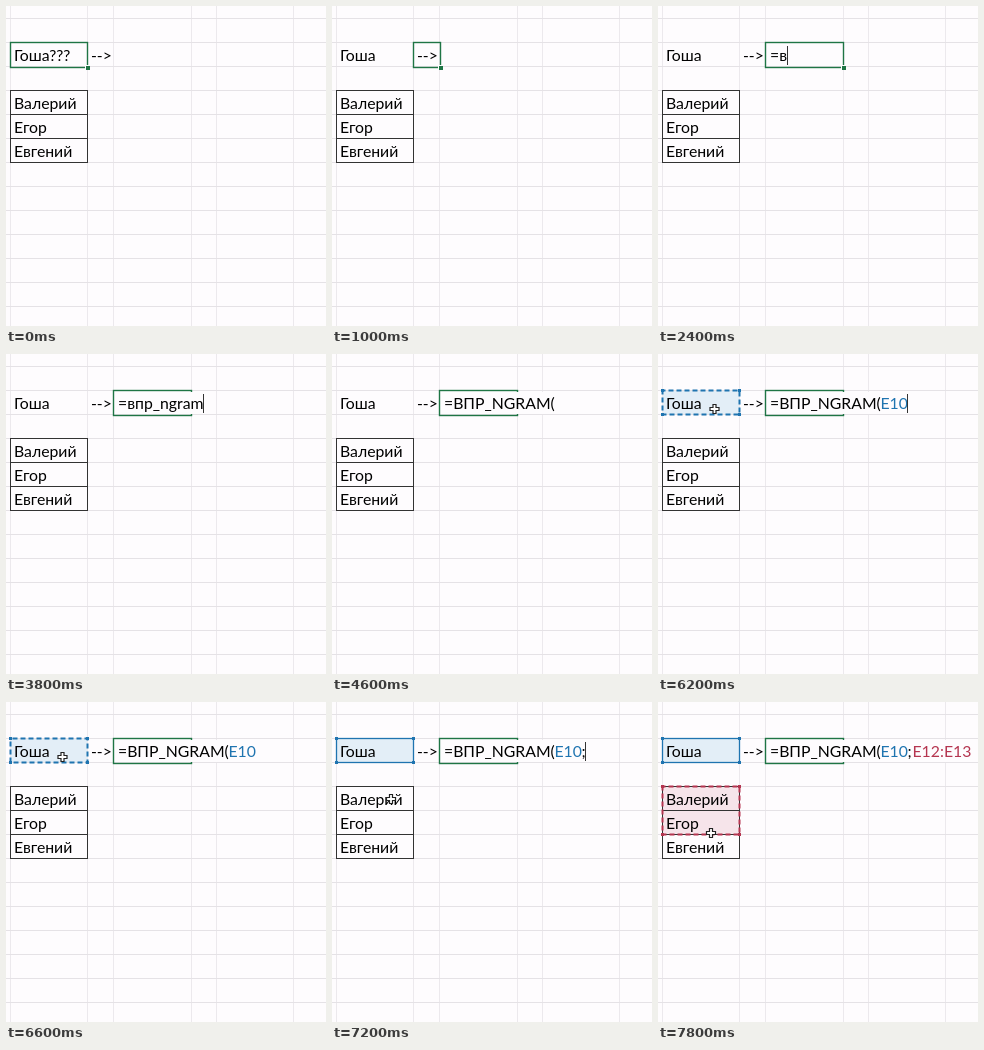
An HTML page with a canvas for the animation above (8 s loop, 320 px wide and 320 px high).

```html
<!DOCTYPE html>
<html lang="ru">
<head>
<meta charset="utf-8">
<style>
  html, body { margin: 0; width: 100%; height: 100%; overflow: hidden; background: #fefcfe; }
  canvas { display: block; width: 320px; height: 320px; }
</style>
</head>
<body>
<canvas id="sheet"></canvas>
<script>
const LOOP = 8000, STEP = 200;
const GREEN = '#1f7545', BLUE = '#1f74b0', RED = '#b53550', PAPER = '#fefcfe', INK = '#000';
const COLS = [4, 81, 107, 185, 210, 287];
const ROW_H = 24, TOP = 36, LIST_TOP = TOP + 2 * ROW_H;
const [LEFT, RIGHT] = COLS;

const canvas = document.getElementById('sheet');
const ctx = canvas.getContext('2d');
const dpr = window.devicePixelRatio || 1;
canvas.width = canvas.height = 320 * dpr;
ctx.scale(dpr, dpr);

// Time-stamped states; the latest one that has started is shown.
const query = [[0, 'Гоша???'], [200, 'Гоша??'], [400, 'Гоша?'], [600, 'Гоша']];
const formula = [
  [0, ''], [2000, '='], [2400, '=в'], [2600, '=впр_'], [3000, '=впр_ng'],
  [3400, '=впр_ngr'], [3600, '=впр_ngram'], [4000, '=ВПР_NGRAM('],
  [5800, '=ВПР_NGRAM(|E10'], [6800, '=ВПР_NGRAM(|E10|;'],
  [7400, '=ВПР_NGRAM(|E10|;|E12'], [7800, '=ВПР_NGRAM(|E10|;|E12:E13']
];
const PIECES = [[112, INK], [222.5, BLUE], [249.5, INK], [254.5, RED]];
const selection = [[0, 4, 81], [800, 4, 81], [1000, 81, 108], [1200, 81, 108], [1400, 107, 185]];
const pointer = [
  [5000, 150, 258], [5600, 56.5, 55], [6600, 56.5, 55],
  [7200, 59, 97], [7400, 57, 98], [7800, 53, 131]
];

const latest = (list, t) => list.filter(s => s[0] <= t).pop();

function tween(list, t) {
  const i = list.findIndex(s => s[0] > t);
  if (i < 0) return list[list.length - 1].slice(1);
  if (i === 0) return list[0].slice(1);
  const a = list[i - 1], b = list[i];
  const u = (t - a[0]) / (b[0] - a[0]), e = u * u * (3 - 2 * u);
  return a.slice(1).map((v, k) => v + (b[k + 1] - v) * e);
}

function box(x, y, w, h, color) {
  ctx.fillStyle = color;
  ctx.fillRect(x, y, w, h);
}

function frame(x0, y0, x1, y1, color, width = 1) {
  ctx.strokeStyle = color;
  ctx.lineWidth = width;
  ctx.strokeRect(x0 + .5, y0 + .5, x1 - x0, y1 - y0);
}

function text(str, x, baseline, color = INK) {
  ctx.fillStyle = color;
  ctx.fillText(str, x, baseline);
  return x + ctx.measureText(str).width;
}

function caret(x) {
  box(Math.floor(x), 40, 1, 19, '#333');
}

function grid() {
  box(0, 0, 320, 320, PAPER);
  for (const x of COLS) box(x, 0, 1, 320, '#ece9ed');
  for (let y = TOP % ROW_H; y < 320; y += ROW_H) box(0, y, 320, 1, '#e5e2e6');
}

function tint(y0, y1, color) {
  box(LEFT + 1, y0 + 1, RIGHT - LEFT - 1, y1 - y0 - 1, color);
}

// Outline of a range picked while the formula is edited, with corner handles.
function reference(y0, y1, color, marching, t) {
  if (marching) {
    ctx.setLineDash([5, 3]);
    ctx.lineDashOffset = -t / 100;
  }
  frame(LEFT, y0, RIGHT, y1, color, marching ? 2 : 1.3);
  ctx.setLineDash([]);
  for (const x of [LEFT, RIGHT]) for (const y of [y0, y1]) box(x - 1, y - 1, 3, 3, color);
}

function activeCell(t, editing) {
  const [x0, x1] = tween(selection, t), bottom = TOP + ROW_H + 1;
  frame(x0, TOP, x1, bottom, GREEN, 1.4);
  if (!editing) {
    box(x1 - 2, bottom - 2, 5, 5, PAPER);
    box(x1 - 1, bottom - 1, 4, 4, GREEN);
  }
}

function drawFormula(str, caretOn) {
  const parts = str.split('|');
  const last = parts.length - 1;
  const end = PIECES[last][0] + ctx.measureText(parts[last]).width;
  if (end > 183) box(109, 38, end - 106, 22, PAPER);
  parts.forEach((part, i) => text(part, PIECES[i][0], 55, PIECES[i][1]));
  if (caretOn) caret(end);
}

function drawPointer(x, y) {
  const plus = new Path2D('M-1.5-4.5h3v3h3v3h-3v3h-3v-3h-3v-3h3z');
  ctx.save();
  ctx.translate(x, y);
  ctx.fillStyle = '#fff';
  ctx.strokeStyle = '#222';
  ctx.lineWidth = 1.2;
  ctx.fill(plus);
  ctx.stroke(plus);
  ctx.restore();
}

function draw(t) {
  ctx.font = '15.8px Lato, "Noto Sans", sans-serif';
  ctx.textBaseline = 'alphabetic';
  grid();

  const picking = t >= 5800, dragging = t >= 7400;
  const rangeEnd = LIST_TOP + (t >= 7800 ? 2 : 1) * ROW_H;
  if (picking) {
    tint(TOP, TOP + ROW_H, '#e3eef7');
    reference(TOP, TOP + ROW_H, BLUE, t < 6800, t);
  }
  if (dragging) tint(LIST_TOP, rangeEnd, '#f6e4ea');

  ['Валерий', 'Егор', 'Евгений'].forEach((name, i) => {
    const y = LIST_TOP + i * ROW_H;
    frame(LEFT, y, RIGHT, y + ROW_H, '#333');
    text(name, 8, y + 19);
  });
  if (dragging) reference(LIST_TOP, rangeEnd, RED, true, t);

  const queryEnd = text(latest(query, t)[1], 8, 55);
  text('-->', 85, 55);
  const editingQuery = t >= 200 && t < 1000;
  activeCell(t, editingQuery || t >= 2600);
  if (editingQuery) caret(queryEnd);

  const [typedAt, str] = latest(formula, t);
  if (str) drawFormula(str, !dragging && (t - typedAt) % 1060 < 530);

  if (t >= 5000) drawPointer(...tween(pointer, t));
}

function tick(now) {
  const t = now % LOOP;
  draw(Math.floor(t / STEP) * STEP);
  requestAnimationFrame(tick);
}
requestAnimationFrame(tick);
</script>
</body>
</html>
```
